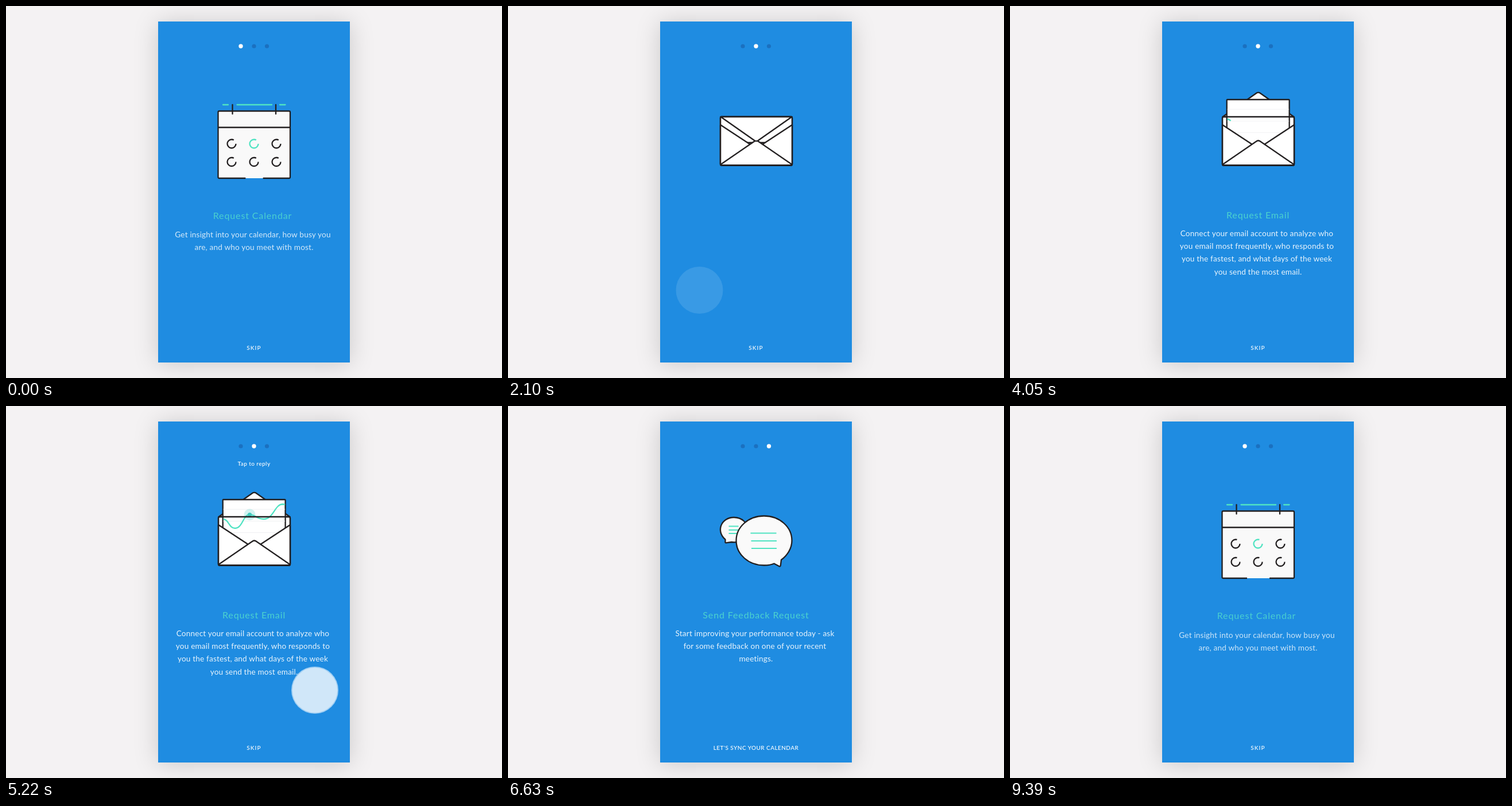
Write an HTML page that moves like this. It is 864 px wide and 648 px high and loops after 9.42 s.

```html
<!DOCTYPE html>
<html lang="en">
<head>
<meta charset="utf-8">
<title>Onboarding</title>
<style>
  html, body { margin: 0; width: 100%; height: 100%; overflow: hidden; background: #f4f2f3; }
  #phone { position: absolute; left: 265px; top: 27px; width: 334px; height: 594px;
    background: #1f8ce1; box-shadow: 0 2px 40px rgba(0, 0, 0, .17); }
  svg { position: absolute; left: 0; top: 0; }
  text { font-family: Lato, "Open Sans", sans-serif; text-anchor: middle; fill: #fff; }
  .title { font-size: 16px; letter-spacing: .87px; fill: #4cd3ce; }
  .body { font-size: 13.6px; letter-spacing: .18px; fill-opacity: .9; }
  .small { font-size: 10px; letter-spacing: .45px; font-weight: 500; }
  .skip { letter-spacing: 1.1px; }
  .ink, .mint, .face, .arrow { fill: none; stroke-width: 2.3; stroke-linejoin: round; }
  .ink { stroke: #221f20; }
  .mint { stroke: #50e3c2; }
  .face { stroke: #4a84c4; stroke-width: 1.8; }
  .arrow { stroke: #fff; stroke-width: 1.7; stroke-linecap: round; }
  .round { stroke-linecap: round; }
  .thin { stroke-width: 1.9; }
  .paper { fill: #fff; }
  .cloud { fill: #fafafa; }
  #blur { isolation: isolate; }
  #blur circle { fill: #fff; mix-blend-mode: plus-lighter; }
</style>
</head>
<body>
<div id="phone"></div>
<svg width="864" height="648" viewBox="0 0 864 648">
  <defs>
    <clipPath id="screen"><rect x="265" y="27" width="334" height="594"/></clipPath>
    <clipPath id="pocket"><rect x="370" y="140" width="125" height="137"/></clipPath>
    <clipPath id="sheetClip"><rect x="378.5" y="150" width="107.6" height="120"/></clipPath>
  </defs>
  <g id="dots"></g>
  <text class="small" id="tap" x="432" y="104">Tap to reply</text>
  <text class="small skip" id="skip" x="432" y="599">SKIP</text>
  <text class="small" id="sync" x="432" y="599">LET'S SYNC YOUR CALENDAR</text>

  <g clip-path="url(#screen)">
    <g id="page0">
      <rect id="calFill" x="369.5" y="183" width="125.5" height="117" rx="2"/>
      <g id="calFrame">
        <path class="ink" pathLength="1" d="M432 183H371.5Q369.5 183 369.5 185V298Q369.5 300 371.5 300H432.5"/>
        <path class="ink" pathLength="1" d="M432 183H493Q495 183 495 185V298Q495 300 493 300H432.5"/>
      </g>
      <g id="calTop">
        <path class="ink" pathLength="1" d="M369.5 211.5H495"/>
        <path class="ink round" pathLength="1" d="M394.5 172V188"/>
        <path class="ink round" pathLength="1" d="M470 172V188"/>
        <path class="mint round" pathLength="1" d="M378 172H387"/>
        <path class="mint round" pathLength="1" d="M402.5 172H463"/>
        <path class="mint round" pathLength="1" d="M477 172H486.5"/>
      </g>
      <g id="rings"></g>
      <path class="mint round" id="handle" pathLength="1" d="M444 251.5L454 262"/>
      <g id="finder">
        <circle class="mint thin" pathLength="1" cx="432" cy="235" r="3.1"/>
        <path class="mint round thin" pathLength="1" d="M426 247.3C426 238.6 438 238.6 438 247.3"/>
      </g>
      <g id="copy0"></g>
    </g>

    <g id="page1">
      <g id="mail">
        <path class="ink paper" id="flapBack"/>
        <rect class="ink paper" x="370" y="193" width="125" height="84.5" rx="2"/>
        <g clip-path="url(#pocket)">
          <g id="sheet">
            <rect class="ink paper" x="377.7" y="163" width="108.9" height="130" rx="1"/>
            <g id="people" transform="translate(0 3)">
              <path class="mint round" pathLength="1" d="M428 185.5A6.5 6.5 0 1 1 430.5 190.5"/>
              <path class="mint round" pathLength="1" d="M418.8 189A3.9 3.9 0 1 1 420 193"/>
              <path class="mint round" pathLength="1" d="M416 197C415 200 415 205 416 212"/>
              <path class="mint round" pathLength="1" d="M424 199C420 204 421 208 421.5 214"/>
              <path class="mint round" pathLength="1" d="M432 202L440 211"/>
            </g>
            <g id="chart" clip-path="url(#sheetClip)">
              <path id="grid" d="M378 180H487M378 200.5H487M378 220.5H487" stroke="#eff0f2"/>
              <path class="mint" id="curve" pathLength="1" d="M378 197C388 197 388 213 399 213C412 213 413 189 424.5 189C433 189 437 197 449 197C466 197 468 171 482 171L487 171.6"/>
              <circle id="halo" cx="424.5" cy="189.3" fill="#4bd0c8" fill-opacity=".25"/>
              <circle id="point" cx="424.5" cy="189.3" fill="#45cbbf"/>
            </g>
          </g>
        </g>
        <path class="paper" d="M370 207L424 242.5L370 276ZM495 207L441 242.5L495 276Z"/>
        <path class="ink" d="M370 207L424 242.5M495 207L441 242.5"/>
        <path class="paper" d="M370.5 276.5L429.5 235.5Q432.5 233.5 435.5 235.5L494.5 276.5Z"/>
        <path class="ink" d="M370.5 276L429.5 235.5Q432.5 233.5 435.5 235.5L494.5 276"/>
        <rect class="ink" x="370" y="193" width="125" height="84.5" rx="2" clip-path="url(#lower)"/>
        <path class="ink" d="M370 207V275.5Q370 277.5 372 277.5H493Q495 277.5 495 275.5V207"/>
        <path class="ink paper" id="flapFront"/>
      </g>
      <g id="copy1"></g>
    </g>

    <g id="page2">
      <g id="chat">
        <g id="reply">
          <path class="ink cloud" d="M-15 16.5C-32 2 -22 -22 0 -22C14 -22 24.5 -12 24.5 0C24.5 14 12 23 -4 21L-14 22.3Q-15.5 22 -15 20Z"/>
          <path class="mint lines thin" d="M-9 -6.5H8M-9 0H8M-9 6H8"/>
          <g class="mood">
            <circle class="face" r="11"/>
            <path class="face round mouth" data-size="4.5"/>
          </g>
        </g>
        <g id="bubble">
          <path class="ink cloud" d="M30 33.5L28.8 43Q28.5 45.5 26 44.6L17.5 40C12 42.5 6 43 0 43C-27 43 -48.5 24 -48.5 0C-48.5 -24 -27 -43 0 -43C27 -43 48.5 -24 48.5 0C48.5 13 41 25.5 30 33.5Z"/>
          <path class="mint lines thin" d="M-23.5 -13H21.5M-22.5 .5H22M-22 13.5H22"/>
          <g class="mood">
            <circle class="face" r="22"/>
            <path class="face round mouth" data-size="9"/>
          </g>
        </g>
        <path class="ink paper thin" id="hand" d="M483 210.6C481 210.8 481.5 213 482.5 214L487.8 219.6L484 221C481.5 222 482.6 224.5 484.8 224.6L490.5 229L496.5 230.6L504.8 222.8C505.3 219 503 212 501 211.4L498 212.6C497 210.6 494.6 210.8 494 213C493 211 490.6 211.2 490.4 213.6L488.6 214.6Z"/>
        <path class="arrow" id="arrows" d="M543.3 218.5V207.5M539.7 211L543.3 207L547 211M543.3 250V261M539.7 257.7L543.3 261.7L547 257.7"/>
      </g>
      <g id="copy2"></g>
    </g>
  </g>

  <g id="blur"></g>
  <circle id="rim" fill="none" stroke="#1f8ce1" stroke-width="1.8"/>
</svg>
<script>
const LOOP = 9420, SAMPLES = 12, SHUTTER = 28, LAG = 3870;
const $ = id => document.getElementById(id);
const all = sel => [...document.querySelectorAll(sel)];
const set = (el, attrs) => { for (const a in attrs) el.setAttribute(a, attrs[a]); };
const fade = (el, o) => { el.style.opacity = o; };

const clamp = v => Math.min(1, Math.max(0, v));
const step = (t, a, b) => clamp((t - a) / (b - a));
const out = p => 1 - (1 - p) ** 2;
const inOut = (p, n) => p < .5 ? 2 ** (n - 1) * p ** n : 1 - 2 ** (n - 1) * (1 - p) ** n;
const mix = (a, b, p) => a + (b - a) * p;

// Draws the first part p of a stroke whose pathLength is 1.
function trim(el, p) {
  set(el, { 'stroke-dasharray': p >= 1 ? 'none' : `${p} 2` });
  el.style.visibility = p > 0 ? 'visible' : 'hidden';
}
const trimAll = (group, p) => { for (const el of group.children) trim(el, p); };

function add(parent, tag, attrs, text = '') {
  const el = document.createElementNS('http://www.w3.org/2000/svg', tag);
  set(el, attrs);
  el.textContent = text;
  return parent.appendChild(el);
}

const copy = [
  [429.5, 'Request Calendar', 'Get insight into your calendar, how busy you', 'are, and who you meet with most.'],
  [432, 'Request Email', 'Connect your email account to analyze who', 'you email most frequently, who responds to',
    'you the fastest, and what days of the week', 'you send the most email.'],
  [432, 'Send Feedback Request', 'Start improving your performance today - ask',
    'for some feedback on one of your recent', 'meetings.']
];
const texts = copy.map(([x, title, ...lines], i) => {
  const head = add($('copy' + i), 'text', { class: 'title', x, y: 370 }, title);
  const body = add($('copy' + i), 'g', {});
  lines.forEach((line, n) =>
    add(body, 'text', { class: 'body', x: n < lines.length - 1 ? 430 : 432, y: 401 + n * 22.2 }, line));
  return [head, body];
});

const dots = [409, 432, 454.5].map(cx => {
  add($('dots'), 'circle', { cx, cy: 70, r: 3.6, fill: '#1b70bf' });
  return add($('dots'), 'circle', { cx, cy: 70, r: 3.7, fill: '#fff' });
});
const rings = [240, 271.5].flatMap(cy => [393, 432, 471].map(cx =>
  add($('rings'), 'circle', { class: cy === 240 && cx === 432 ? 'mint' : 'ink', cx, cy, r: 7.5, pathLength: 1 })));
const ghosts = Array.from({ length: SAMPLES }, () => add($('blur'), 'circle', {}));

function rise(i, t, start) {
  texts[i].forEach((el, n) => {
    const p = out(step(t, start + n * 63, start + n * 63 + 540));
    set(el, { transform: `translate(0 ${20 * (1 - p)})` });
    fade(el, p);
  });
}
function slide(i, t, from, leave) {
  const p = step(t, leave, leave + 360);
  $('page' + i).style.display = t >= from && p < 1 ? '' : 'none';
  set($('page' + i), { transform: `translate(${-340 * inOut(p, 4)} 0)` });
}
function popIn(el, t, a, b, cx, cy) {
  const p = out(step(t, a, b)), s = mix(.85, 1, p);
  set(el, { transform: `translate(${cx} ${cy}) scale(${s}) translate(${-cx} ${-cy})` });
  fade(el, p);
}

function calendar(t) {
  slide(0, t, -662, 1450);
  const warm = step(t, 300, 900);
  set($('calFill'), { fill: `rgb(${249 - 4 * warm},${249 - 3 * warm},${249 + 2 * warm})` });
  fade($('calFill'), step(t, -660, -480));
  trimAll($('calFrame'), out(step(t, -658, 222)));
  trimAll($('calTop'), out(step(t, -560, -120)));
  rings.forEach(el => trim(el, out(step(t, -456, 314))));
  set(rings[1], { r: mix(7.5, 16.4, inOut(step(t, 340, 620), 3)) });
  trim($('handle'), out(step(t, 560, 760)));
  trimAll($('finder'), out(step(t, 580, 900)));
  rise(0, t, -433);
}

function mail(t) {
  slide(1, t, 1760, 1450 + LAG);
  popIn($('mail'), t, 1760, 1940, 432, 235);
  const peak = mix(236, 150, out(step(t, 2352, 3152)));
  const isOpen = peak < 193, shoulder = peak + (isOpen ? 1.2 : -1.2);
  const d = `M370.5 193L430 ${shoulder}Q432.5 ${peak} 435 ${shoulder}L494.5 193Z`;
  set($('flapBack'), { d: isOpen ? d : '' });
  set($('flapFront'), { d: isOpen ? '' : d });
  const top = mix(238, 160, out(step(t, 2560, 2880))) + 3 * inOut(step(t, 2960, 3300), 2);
  set($('sheet'), { transform: `translate(0 ${top - 163})` });
  trimAll($('people'), out(step(t, 2840, 3400)));
  fade($('people'), 1 - step(t, 3870, 4020));
  fade($('grid'), step(t, 3900, 4100));
  trim($('curve'), inOut(step(t, 3960, 4520), 2));
  set($('point'), { r: 3.6 * out(step(t, 4400, 4650)) });
  set($('halo'), { r: 10 * out(step(t, 4460, 4760)) });
  rise(1, t, 2130);
}

function chat(t) {
  slide(2, t, 5620, 8360);
  popIn($('chat'), t, 5620, 5800, 432, 236);
  const tilt = 1 - inOut(step(t, 6080, 6650), 3);
  set($('bubble'), { transform: `translate(${446 - 8 * tilt} ${234.5 + 3.3 * tilt}) rotate(${-9 * tilt}) scale(${1 + .06 * tilt})` });
  set($('reply'), { transform: `translate(${393.5 + 2.5 * tilt} ${216 + tilt}) rotate(${8 * tilt})` });
  const mood = step(t, 6780, 6960);
  all('.lines').forEach(el => fade(el, 1 - step(t, 6740, 6860)));
  all('.mood').forEach(el => fade(el, mood));
  const pull = inOut(step(t, 7120, 7600), 3);
  all('.mouth').forEach(el => {
    const w = +el.dataset.size, y = w * .45, bend = w * mix(.85, -.85, pull);
    set(el, { d: `M${-w} ${y - bend * .2}Q0 ${y + bend * .8} ${w} ${y - bend * .2}` });
  });
  set($('hand'), { transform: `translate(0 ${-11 * (1 - pull)})` });
  fade($('hand'), step(t, 6900, 7060));
  fade($('arrows'), step(t, 6900, 7100));
  rise(2, t, 6050);
}

// Each touch: times of showing, pressing, releasing and leaving, then its path.
const swipe = [960, 1355, 1720, 1930];
const touches = [
  { at: swipe, x: 538, dx: -204.5, y: 495 },
  { at: swipe.map(v => v + LAG), x: 538, dx: -204.5, y: 495 },
  { at: [7970, 8200, 8380, 8500], x: 432, dx: 0, y: 601 }
];
function touch(t) {
  const now = touches.find(({ at }) => t > at[0] && t < at[3] + 200);
  $('blur').style.display = $('rim').style.display = now ? '' : 'none';
  if (!now) return;
  const [show, press, release, leave] = now.at;
  const held = out(step(t, press, press + 95)) - out(step(t, release, release + 100));
  const r = 41 - 10 * held, cy = now.y;
  const alpha = step(t, show, show + 230) * (1 - step(t, leave, leave + 200));
  const xAt = s => now.x + now.dx * inOut(step(s, press + 20, press + 370), 3);
  ghosts.forEach((el, i) => set(el, {
    cx: xAt(t + ((i + .5) / SAMPLES - .5) * SHUTTER), cy, r, 'fill-opacity': 1 / SAMPLES
  }));
  fade($('blur'), .8 * alpha);
  set($('rim'), { cx: xAt(t), cy, r: r - .9 });
  fade($('rim'), .28 * alpha * (1 - step(t, press, press + 50)));
}

function chrome(t) {
  const second = step(t, 1660, 1800), third = step(t, 1660 + LAG, 1800 + LAG), back = step(t, 8700, 8860);
  [1 - second + back, second - third, third - back].forEach((o, i) => fade(dots[i], o));
  fade($('tap'), step(t, 990, 1250) - step(t, 1620, 1760) + step(t, 4600, 4850) - step(t, 5490, 5630));
  fade($('skip'), 1 - step(t, 5540, 5640) + step(t, 8800, 8920));
  fade($('sync'), step(t, 5620, 5740) - step(t, 8700, 8800));
}

const start = performance.now();
function frame() {
  const t = (performance.now() - start) % LOOP;
  calendar(t > 7000 ? t - LOOP : t);
  mail(t);
  chat(t);
  touch(t);
  chrome(t);
  requestAnimationFrame(frame);
}
frame();
</script>
</body>
</html>
```
